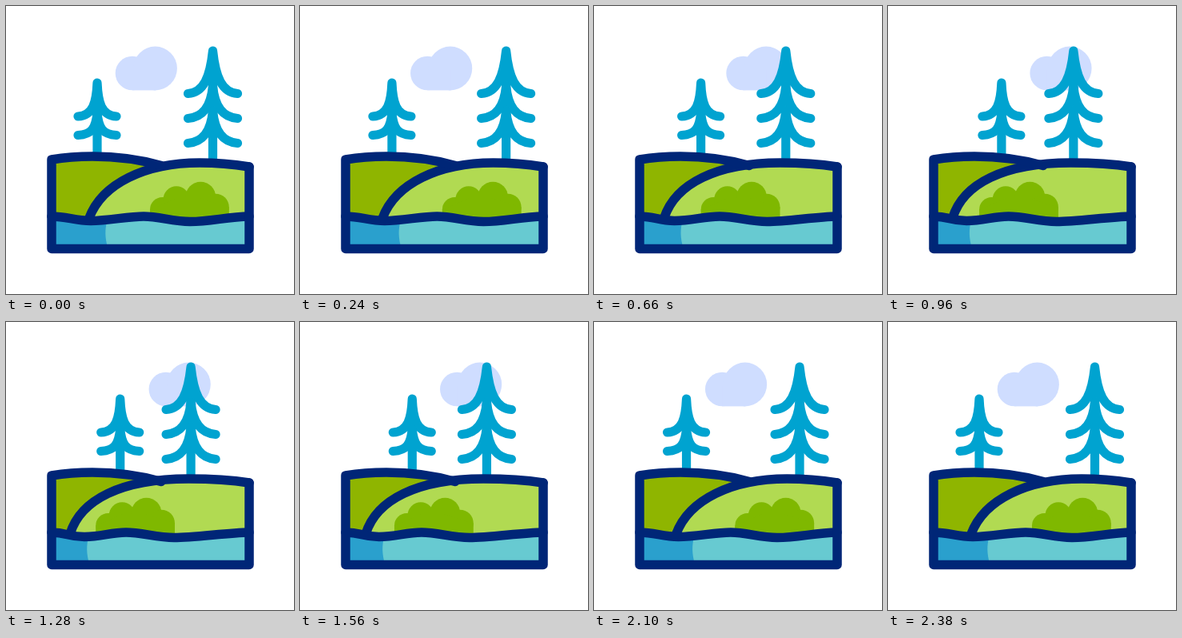
These frames come from a looping animation (360 by 360 pixels, 2400 ms). An HTML page:

```html
<!DOCTYPE html>
<html lang="en">
<head>
<meta charset="utf-8">
<title>Landscape</title>
<style>
  html, body { margin: 0; width: 100%; height: 100%; overflow: hidden; background: #fff; }
  svg { display: block; width: 100vw; height: 100vh; }
  .line, .tree { fill: none; stroke-linecap: round; stroke-linejoin: round; }
  .line { stroke: #002677; stroke-width: 11.5; }
  .tree { stroke: #00a3d0; stroke-width: 11.2; }
</style>
</head>
<body>
<svg viewBox="0 0 360 360">
  <g id="cloud" fill="#cfddff">
    <circle cx="158" cy="84" r="21.3"/>
    <circle cx="186.5" cy="78" r="27.4"/>
    <rect x="158" y="80" width="29" height="25.4"/>
  </g>
  <g id="small" class="tree">
    <path d="M114 96V190M90 138C109 137 113 120 114 96C115 120 119 137 138 138"/>
    <path d="M90 161.5C107 160.5 112 153 114 134C116 153 121 160.5 138 161.5"/>
  </g>
  <g id="big" class="tree">
    <path d="M258.5 56V196M227.5 109.5C247 108 255 89 258.5 56C262 89 270 108 289.5 109.5"/>
    <path d="M227.5 140.5C246 139 256 126 258.5 100C261 126 271 139 289.5 140.5"/>
    <path d="M227.5 171.5C246 170 256 157 258.5 131C261 157 271 170 289.5 171.5"/>
  </g>
  <path fill="#8fb500" d="M57 192C75 189 92 188 108 188C140 188 168 192 194 199.5V270H57Z"/>
  <path id="hillFill" fill="#b1da52"/>
  <g id="bush" fill="#7fb800">
    <circle cx="195.5" cy="254.5" r="15.5"/>
    <circle cx="213" cy="241.8" r="16.5"/>
    <circle cx="243.3" cy="238.5" r="18.8"/>
    <circle cx="262" cy="251.5" r="16.8"/>
    <path d="M180 254.5L213 240H242L278.8 251.5V268H180Z"/>
  </g>
  <path id="water" fill="#67cad1"/>
  <path id="deep" fill="#2aa0cd"/>
  <path id="hillLine" class="line"/>
  <path id="wave" class="line"/>
  <path class="line" d="M194 199.5C168 192 140 188 108 188C92 188 75 189 57 192V303.5H304V201"/>
</svg>
<script>
const PERIOD = 2400;
const $ = id => document.getElementById(id);
const setPath = (id, d) => $(id).setAttribute('d', d);
const shift = (id, x) => $(id).setAttribute('transform', `translate(${x} 0)`);

// cubic-bezier(.75, 0, .25, 1), solved by bisection
function ease(p) {
  let lo = 0, hi = 1;
  for (let i = 0; i < 24; i++) {
    const s = (lo + hi) / 2, r = 1 - s;
    if (2.25 * r * r * s + 0.75 * r * s * s + s * s * s < p) lo = s; else hi = s;
  }
  return lo * lo * (3 - 2 * lo);
}

function draw(time) {
  const p = (time % PERIOD) / (PERIOD / 2);
  const k = p < 1 ? ease(p) : 1 - ease(p - 1);

  shift('cloud', 42 * k);
  shift('small', 28.8 * k);
  shift('big', -27.5 * k);
  shift('bush', -68 * k);

  const x = 104 - 24 * k;
  const hill = `M${x} 265C${x + 16 - 3 * k} 222 ${x + 70 - 6 * k} 196 ${242 - 14 * k} 196` +
    `C${264 - 8 * k} 196 285 198 304 201`;
  setPath('hillLine', hill);
  setPath('hillFill', hill + `V270H${x}Z`);

  // dip, crest and dip of the water line
  const a = 106 - 8 * k, b = 172 - 22 * k, c = 230 - 20 * k;
  const wave = `M57 263C76 263 ${a - 20} 268.5 ${a} 268.5C${a + 22} 268.5 ${b - 20} 263 ${b} 263` +
    `C${b + 20} 263 ${c - 22} 269.5 ${c} 269.5C${c + 26} 269.5 276 263.5 304 263`;
  setPath('wave', wave);
  setPath('water', wave + 'V303H57Z');

  const d = 124.5 - 23.2 * k;
  setPath('deep', `M57 263L${a} 268H${d + 2}C${d - 1} 279 ${d - 1} 290 ${d + 3} 303H57Z`);
}

function frame(now) {
  draw(now);
  requestAnimationFrame(frame);
}
draw(0);
requestAnimationFrame(frame);
</script>
</body>
</html>
```
